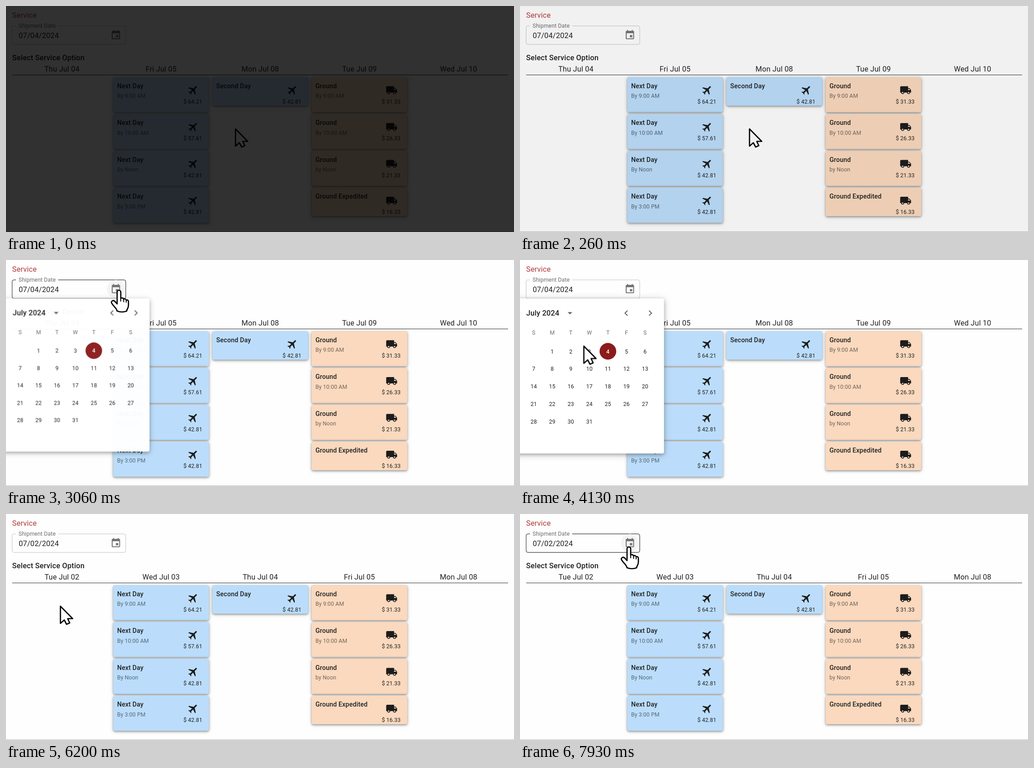
Recreate the animation shown at these times as an HTML page. Size 1120 by 500 pixels, loop 8 s.

```html
<!DOCTYPE html>
<html lang="en">
<head>
<meta charset="utf-8">
<title>Shipment service picker</title>
<style>
  html, body { margin: 0; width: 100%; height: 100%; overflow: hidden; background: #fefefe; }
  svg { display: block; width: 1120px; height: 500px; }
  text { font: 400 16.35px Roboto, sans-serif; letter-spacing: .00938em; fill: #212121; }
  .strong { font-weight: 500; }
  .mid { text-anchor: middle; }
  .end { text-anchor: end; }
  .small { font-size: 12.27px; }
  .name { font-size: 14.3px; font-weight: 500; letter-spacing: .00714em; }
  .grey { fill: #6c6c6c; }
  .soft { fill: #000; fill-opacity: .54; }
  .card { filter: drop-shadow(0 2px 2px rgba(0,0,0,.34)) drop-shadow(0 1px 4px rgba(0,0,0,.16)); }
  .paper { filter: drop-shadow(0 3px 4px rgba(0,0,0,.25)) drop-shadow(0 2px 8px rgba(0,0,0,.18)); }
  .pointer path { fill: #fff; stroke: #000; stroke-width: 2.7; stroke-linejoin: round; stroke-linecap: round; }

  .px { animation: px 8s cubic-bezier(.4,0,.2,1) infinite; }
  .py { animation: py 8s cubic-bezier(.4,0,.2,1) infinite; }
  .popup { transform-origin: 154px 85px; animation: popup 8s cubic-bezier(.4,0,.2,1) infinite; }
  .fade { animation: fade 8s linear infinite; }

  @keyframes px {
    0%, 19.375% { transform: translateX(506px); }
    30.375%, 45.34% { transform: translateX(249px); }
    56.625%, 83.5% { transform: translateX(120px); }
    99.125%, 100% { transform: translateX(240px); }
  }
  @keyframes py {
    0%, 19.375% { transform: translateY(272px); }
    30.375%, 42.925% { transform: translateY(67px); }
    56.625%, 83.5% { transform: translateY(204px); }
    99.125%, 100% { transform: translateY(73px); }
  }
  @keyframes popup {
    0%, 35.5% { opacity: 0; transform: scale(.75, .56); }
    39%, 58.5% { opacity: 1; transform: none; }
    61.5%, 100% { opacity: 0; transform: scale(.75, .56); }
  }
  @keyframes fade {
    0% { opacity: .81; }
    1.625% { opacity: .39; }
    3.25% { opacity: .05; }
    5%, 100% { opacity: 0; }
  }
</style>
</head>
<body>
<svg viewBox="0 0 1120 500" xmlns="http://www.w3.org/2000/svg">
  <defs>
    <path id="plane" transform="rotate(45) scale(1.1) translate(-12 -12)" fill="#1c1c1c" d="M21 16v-2l-8-5V3.5c0-.83-.67-1.5-1.5-1.5S10 2.67 10 3.5V9l-8 5v2l8-2.5V19l-2 1.5V22l3.5-1 3.5 1v-1.5L13 19v-5.5z"/>
    <path id="truck" transform="scale(1.09) translate(-12 -12)" fill="#1c1c1c" d="M20 8h-3V4H3c-1.1 0-2 .9-2 2v11h2a3 3 0 0 0 6 0h6a3 3 0 0 0 6 0h2v-5zM6 18.5a1.5 1.5 0 1 1 0-3 1.5 1.5 0 0 1 0 3zm13.5-9 1.96 2.5H17V9.5zm-1.5 9a1.5 1.5 0 1 1 0-3 1.5 1.5 0 0 1 0 3z"/>
  </defs>
  <rect width="1120" height="500" fill="#fefefe"/>
  <rect y="499" width="1120" height="1" fill="#b8b8b8"/>

  <text x="13.6" y="26" style="fill:#b23a3a">Service</text>
  <rect x="13.5" y="44" width="250.5" height="41" rx="4" fill="none" stroke="#c2c2c2"/>
  <rect class="field" x="13.5" y="44" width="250.5" height="41" rx="4" fill="none" stroke="#212121"/>
  <rect x="22" y="42" width="93" height="4" fill="#fefefe"/>
  <text class="small grey" x="27.8" y="47.9">Shipment Date</text>
  <text class="before-pick" x="28" y="70.5">07/04/2024</text>
  <text class="pick" x="28" y="70.5">07/02/2024</text>
  <circle class="icon" cx="242.3" cy="64.3" r="20" fill="#f4f4f4"/>
  <path transform="translate(242.3 64.2) scale(1.022) translate(-12 -12)" fill="#737373" d="M17 12h-5v5h5zM16 1v2H8V1H6v2H5c-1.1 0-2 .9-2 2v14c0 1.1.9 2 2 2h14c1.1 0 2-.9 2-2V5c0-1.1-.9-2-2-2h-1V1zm3 18H5V8h14z"/>

  <text class="strong" x="13.6" y="119.7">Select Service Option</text>
  <g class="before-dates" id="dates1"></g>
  <g class="dates" id="dates2"></g>
  <path d="M13.6 152.5H1107" stroke="#2b2b2b" stroke-width="1.1"/>
  <g id="cards"></g>

  <g class="popup">
    <rect class="paper" x="-10" y="85" width="327.5" height="343" rx="4" fill="#fff"/>
    <text class="strong" x="13.8" y="122.6">July 2024</text>
    <path d="M105 115.3h10.4l-5.2 5.2z" fill="#6b6b6b"/>
    <path d="M237 112l-5.5 5.5 5.5 5.5M284.5 112l5.5 5.5-5.5 5.5" fill="none" stroke="#636363" stroke-width="2"/>
    <circle class="day" cx="112" cy="202" r="18.4" fill="#f6eaea"/>
    <circle class="before-pick" cx="193.8" cy="202" r="18.4" fill="#8c1b1b"/>
    <circle class="pick" cx="112" cy="202" r="18.4" fill="#8c1b1b"/>
    <g id="days"></g>
  </g>

  <g class="px"><g class="py pointer">
    <path class="before-hand" d="M0 0V38L8.5 30.5 13.5 40 20.5 37 16 27.5H27Z"/>
    <g class="hand">
      <path d="M-4 30V4a4 4 0 0 1 8 0V18q3.5-3 6.5 1.5 3.5-2 5.5 2 5-1 5 4V33C21 40 18 40 17 46Q7 50-4 46C-5 40-10 38-16 28.5c-2-4 3-8 7-4Z"/>
      <path style="fill:none;stroke-width:2" d="M4 17v7M10.5 19.5v6M16 21.5v5"/>
    </g>
  </g></g>
  <rect class="fade" width="1120" height="500"/>
</svg>
<script>
  const LOOP = 8000, COL = 218.65, ROW = 81.5;
  const $ = id => document.getElementById(id);
  const text = (x, y, cls, s) => `<text x="${x}" y="${y}" class="${cls}">${s}</text>`;

  // Hard on/off switches; edges alternate between on and off times in ms.
  const toggle = (name, ...edges) => ['before-' + name, name].map((cls, start) => {
    const stops = [0, ...edges].map((ms, i) =>
      `${ms / LOOP * 100}%{opacity:${(i + 1 + start) % 2}}`);
    const last = (edges.length + 1 + start) % 2;
    return `@keyframes ${cls}{${stops.join('')}100%{opacity:${last}}}` +
      `.${cls}{animation:${cls} ${LOOP}ms step-end infinite}`;
  }).join('');

  const style = document.createElement('style');
  style.textContent =
    toggle('hand', 1767, 1930, 2203, 3600, 4230, 4900, 7550) +
    toggle('hover', 1767, 1930) +
    toggle('field', 2113, 3650, 7480) +
    toggle('icon', 2203, 3600, 7550) +
    toggle('day', 4230, 4660) +
    toggle('pick', 4660) +
    toggle('dates', 5860);
  document.head.append(style);

  const dates = list => list.map((d, i) => text(123.3 + COL * i, 145, 'mid', d)).join('');
  $('dates1').innerHTML = dates(['Thu Jul 04', 'Fri Jul 05', 'Mon Jul 08', 'Tue Jul 09', 'Wed Jul 10']);
  $('dates2').innerHTML = dates(['Tue Jul 02', 'Wed Jul 03', 'Thu Jul 04', 'Fri Jul 05', 'Mon Jul 08']);

  const card = (col, row, icon, name, by, price) => {
    const fill = icon === 'plane' ? '#bbddfb' : '#fad9be';
    const box = `width="211" height="${by ? 77.6 : 63.2}" rx="4"`;
    const hover = col === 1 && row === 0 ? `<rect class="hover" ${box} fill="#b2d5f0"/>` : '';
    return `<g transform="translate(${17.85 + COL * col} ${157.3 + ROW * row})">
      <rect class="card" ${box} fill="${fill}"/>${hover}
      ${text(8.4, 24.7, 'name', name)}${text(8.4, 46, 'small soft', by)}
      <use href="#${icon}" x="0" y="0" transform="translate(176.4 28.8)"/>
      ${text(196.2, 58.7, 'small end', '$ ' + price)}</g>`;
  };
  $('cards').innerHTML = [
    [1, 0, 'plane', 'Next Day', 'By 9:00 AM', '64.21'],
    [1, 1, 'plane', 'Next Day', 'By 10:00 AM', '57.61'],
    [1, 2, 'plane', 'Next Day', 'By Noon', '42.81'],
    [1, 3, 'plane', 'Next Day', 'By 3:00 PM', '42.81'],
    [2, 0, 'plane', 'Second Day', '', '42.81'],
    [3, 0, 'truck', 'Ground', 'By 9:00 AM', '31.33'],
    [3, 1, 'truck', 'Ground', 'By 10:00 AM', '26.33'],
    [3, 2, 'truck', 'Ground', 'by Noon', '21.33'],
    [3, 3, 'truck', 'Ground Expedited', '', '16.33']
  ].map(c => card(...c)).join('');

  const dayX = i => 30.2 + 40.92 * (i % 7);
  let days = [...'SMTWTFS'].map((d, i) => text(dayX(i), 165.4, 'small mid grey', d)).join('');
  for (let d = 1; d <= 31; d++) {
    const x = dayX(d), y = 206.5 + 38.9 * Math.floor(d / 7);
    const white = cls => `<g class="${cls}" style="filter:invert(1)">${text(x, y, 'small mid strong', d)}</g>`;
    const plain = cls => `<g class="${cls}">${text(x, y, 'small mid', d)}</g>`;
    days += d === 4 ? white('before-pick') + plain('pick')
      : d === 2 ? plain('before-pick') + white('pick')
      : plain('');
  }
  $('days').innerHTML = days.replaceAll('filter:invert(1)', 'filter:brightness(0) invert(1)');
</script>
</body>
</html>
```
